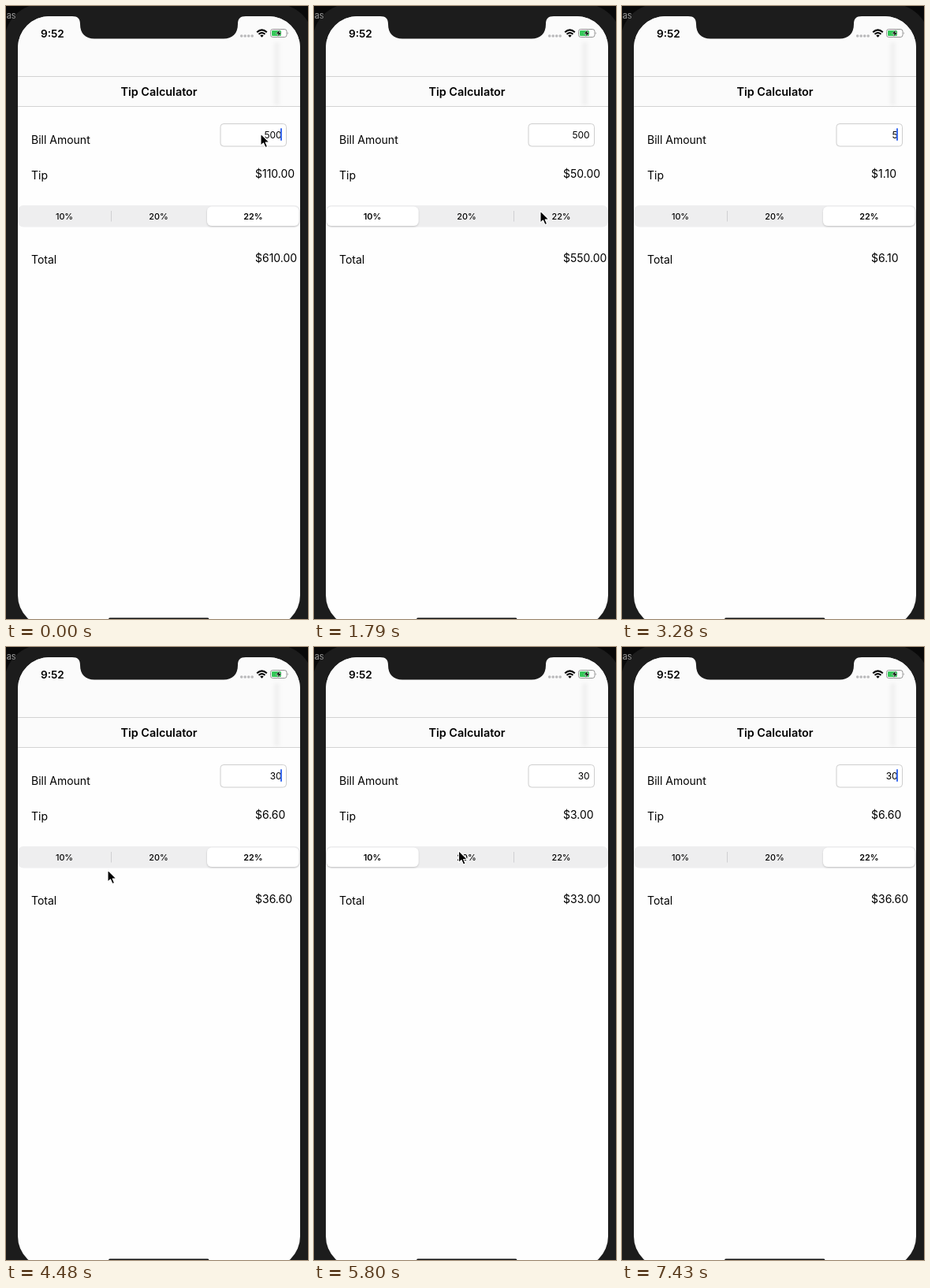
Animation of 383x778 px, one loop 7680 ms. Source, as an HTML page:

```html
<!DOCTYPE html>
<html lang="en">
<head>
<meta charset="utf-8">
<title>Tip Calculator</title>
<style>
  html, body { margin: 0; width: 100%; height: 100%; overflow: hidden; background: #090909; }
  svg { display: block; width: 100%; height: 100%; }
  text { font-family: Inter, "Liberation Sans", sans-serif; font-size: 14px; fill: #000; white-space: pre; }
  .title { font-size: 14.4px; font-weight: 600; text-anchor: middle; }
  .clock { font-size: 13.6px; font-weight: 600; }
  .seg text { font-size: 10.8px; font-weight: 500; text-anchor: middle; }
  .input { font-size: 12px; text-anchor: end; }
</style>
</head>
<body>
<svg viewBox="0 0 383 778">
  <defs>
    <clipPath id="screen"><rect x="15" y="13" width="358" height="775" rx="40"/></clipPath>
    <filter id="soft" x="-20%" y="-40%" width="140%" height="200%">
      <feDropShadow dx="0" dy="1" stdDeviation="1.2" flood-opacity=".2"/>
    </filter>
    <filter id="blur" x="-100%" width="300%"><feGaussianBlur stdDeviation="2"/></filter>
  </defs>

  <!-- Phone body -->
  <rect width="383" height="778" fill="#090909"/>
  <text x="-2" y="16" style="font-size:11px;fill:#858585">las</text>
  <rect x="-2" y="-3" width="392" height="900" rx="48" fill="#1c1c1c"/>
  <text x="-2" y="16" style="font-size:11px;fill:#858585">las</text>

  <g clip-path="url(#screen)">
    <rect x="15" y="13" width="358" height="765" fill="#fefefe"/>
    <rect x="15" y="13" width="358" height="115" fill="#fbfbfb"/>
    <rect x="340" y="46" width="7" height="80" fill="#f1f1f1" filter="url(#blur)"/>
    <path d="M15 89.5H373M15 127.5H373" stroke="#d3d3d3"/>
    <rect x="130" y="776.6" width="127.500" height="5" rx="2" fill="#111"/>
  </g>
  <path d="M84 12V13C91 13 94 16 94 23C94 35 101 41.500 112 41.500H276C287 41.500 294 35 294 23C294 16 297 13 304 13V12Z" fill="#1c1c1c"/>

  <!-- Status bar -->
  <text class="clock" x="44" y="39.500">9:52</text>
  <g fill="#b9b9bb">
    <circle cx="298.700" cy="38" r="1.800"/><circle cx="303.200" cy="38" r="1.800"/>
    <circle cx="307.700" cy="38" r="1.800"/><circle cx="312.200" cy="38" r="1.800"/>
  </g>
  <g fill="none" stroke="#000" stroke-width="2">
    <path d="M318.200 33.200Q324.500 27.600 330.800 33.200"/>
    <path d="M320.500 35.800Q324.500 32.200 328.500 35.800"/>
  </g>
  <path d="M322.300 37.500Q324.500 35.700 326.700 37.500L324.500 39.800Z"/>
  <rect x="335.500" y="29.500" width="20.500" height="10" rx="2.800" fill="#fff" stroke="#929292"/>
  <rect x="337" y="31" width="12" height="7" rx="1.300" fill="#35c759"/>
  <path d="M357.300 33Q359 34.500 357.300 36Z" fill="#929292"/>
  <path d="M347.500 30L342.200 35.200H345.300L344.200 39.200L349.600 33.800H346.400Z" stroke="#fff" stroke-width=".5"/>

  <text class="title" x="194" y="113.500">Tip Calculator</text>

  <!-- Form -->
  <text x="32" y="175.300">Bill Amount</text>
  <text x="32" y="220.300">Tip</text>
  <text x="32" y="326.800">Total</text>
  <rect x="272" y="149.500" width="83.500" height="28.500" rx="4" fill="#fff" stroke="#cecece"/>
  <text class="input" id="bill" x="349.700" y="167.700"></text>
  <rect id="caret" x="348" y="155" width="2" height="16" rx="1" fill="#3c6cf0"/>
  <text id="tip" x="316" y="218"></text>
  <text id="total" x="316" y="325.300"></text>

  <g class="seg">
    <rect x="15" y="253" width="358" height="27.500" rx="7" fill="#eeeeef"/>
    <path id="divLeft" d="M133.500 260V273.500" stroke="#cfcfd2"/>
    <path id="divRight" d="M253.500 260V273.500" stroke="#cfcfd2"/>
    <rect id="thumb" y="254.500" width="116.500" height="24.500" rx="6" fill="#fff" filter="url(#soft)"/>
    <text x="74" y="270.500">10%</text>
    <text x="193.500" y="270.500">20%</text>
    <text x="313.500" y="270.500">22%</text>
  </g>

  <path id="cursor" d="M0 0V15.200L3.500 12L6 17.600L8.600 16.500L6.200 11H11Z" stroke="#fff" stroke-width="1.100" stroke-linejoin="round"/>
</svg>

<script>
const LOOP = 7680, TICK = 148.6, LAST_TICK = 50;
const RATES = [0.10, 0.20, 0.22];

// [time, selected segment]
const taps = [[0, 2], [907, 0], [1847, 2], [5012, 0], [6180, 2]];

// [tick, field content]
const typed = [[0, '500'], [21, '50'], [22, '5'], [23, ''], [27, '3'], [28, '30']];

// [tick, x, y] of the pointer tip
const path = [
  [1, 323, 162], [5, 130, 262], [6, 127, 265], [9, 127, 265],
  [12, 287, 260], [15, 287, 259], [16, 340, 180], [17, 348, 187], [18, 351, 189], [29, 140, 288],
  [30, 129, 283], [33, 84, 260], [37, 84, 260],
  [41, 283, 257], [43, 283, 257], [44, 318, 350], [45, 342, 509], [48, 348, 762]
];
const hidden = [[21, 30], [46, 48], [49, 99]];

const $ = id => document.getElementById(id);
const ui = Object.fromEntries(
  ['bill', 'caret', 'tip', 'total', 'divLeft', 'divRight', 'thumb', 'cursor'].map(id => [id, $(id)]));
const labels = document.querySelectorAll('.seg text');

const clamp = v => Math.min(1, Math.max(0, v));
const smooth = v => v * v * (3 - 2 * v);
const latest = (list, at) => list.filter(e => e[0] <= at).pop();
const money = v => '$' + v.toFixed(2);

// Critically damped spring from 0 to 1
function spring(ms) {
  const w = 0.014 * Math.max(0, ms);
  return 1 - (1 + w) * Math.exp(-w);
}

// 0 = thumb on the first segment, 1 = on the last
function thumbPos(t) {
  let pos = 1;
  for (let i = 1; i < taps.length; i++)
    pos += (taps[i][1] - taps[i - 1][1]) / 2 * spring(t - taps[i][0]);
  return pos;
}

function caretAlpha(ms) {
  const p = ms % 1000;
  const fadeIn = ms >= 1000 || p > 500 ? clamp((p - 900) / 100) : 0;
  return p < 900 ? 1 - clamp((p - 505) / 130) : fadeIn;
}

function pointAt(n) {
  const i = path.findIndex(k => k[0] > n);
  if (i === 0) return path[0].slice(1);
  if (i < 0) return path[path.length - 1].slice(1);
  const [a, x0, y0] = path[i - 1], [b, x1, y1] = path[i];
  const k = smooth((n - a) / (b - a));
  return [x0 + (x1 - x0) * k, y0 + (y1 - y0) * k];
}

function draw(ms) {
  const n = Math.min(LAST_TICK, Math.floor((ms + 9) / TICK));
  const t = n * TICK;

  const [keyTick, content] = latest(typed, n);
  const selected = latest(taps, t)[1];
  const bill = Number(content), tip = bill * RATES[selected];
  ui.bill.textContent = content;
  ui.tip.textContent = money(tip);
  ui.total.textContent = money(bill + tip);
  ui.caret.setAttribute('opacity', caretAlpha(t - keyTick * TICK));

  const pos = thumbPos(t);
  ui.thumb.setAttribute('x', 16 + 239 * pos);
  ui.divLeft.setAttribute('opacity', clamp(pos) ** 5);
  ui.divRight.setAttribute('opacity', clamp(1 - pos) ** 8);
  labels.forEach((el, i) => el.style.fontWeight = i === selected ? 600 : 500);

  const [x, y] = pointAt(n);
  ui.cursor.setAttribute('transform', `translate(${x} ${y})`);
  ui.cursor.style.display = hidden.some(([a, b]) => n >= a && n < b) ? 'none' : '';
}

const start = performance.now();
function frame() {
  draw((performance.now() - start) % LOOP);
  requestAnimationFrame(frame);
}
frame();
</script>
</body>
</html>
```
